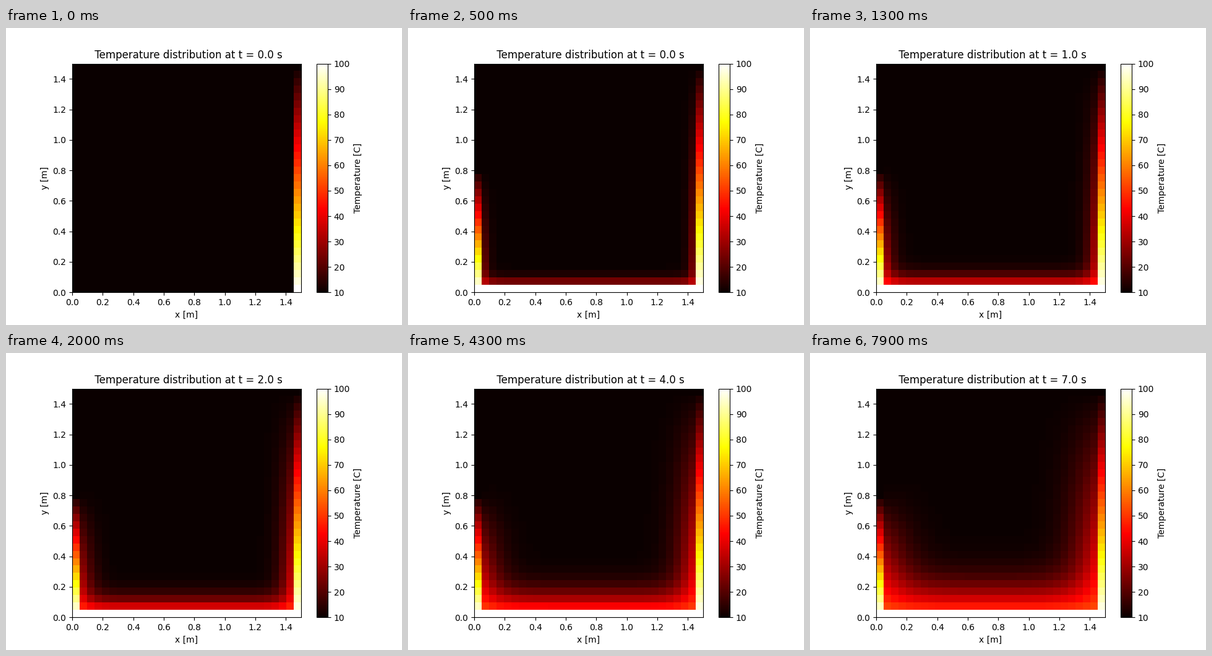
Recreate the animation shown at these times as a matplotlib script. Size 640 by 480 pixels, loop 8 s.

```python
import numpy as np
import matplotlib.pyplot as plt
from matplotlib.animation import FuncAnimation

SIDE = 1.5           # plate edge [m]
N = 31               # nodes per edge
FRAMES, DT = 80, 0.1
RATE = 0.9           # diffusivity / dx^2 [1/s]
COLD, HOT = 10.0, 100.0
SUBSTEPS = 4

y = np.linspace(0, SIDE, N)


def ramp(height):
    """Linear edge profile, hot at the bottom and cold from `height` up."""
    return np.maximum(HOT - (HOT - COLD) * y / height, COLD)


def set_edges(T):
    T[:, 0] = ramp(0.8)
    T[:, -1] = ramp(SIDE)
    T[-1] = COLD
    T[0] = HOT


def solve():
    """Temperature fields for every time step."""
    first = np.full((N, N), COLD)
    first[:, -1] = ramp(SIDE)

    edges = np.full((N, N), COLD)
    set_edges(edges)
    # The plate feels the mean of the cold and the heated edge.
    T = (edges + COLD) / 2

    fields = [first]
    k = RATE * DT / SUBSTEPS
    for _ in range(FRAMES - 1):
        for _ in range(SUBSTEPS):
            inner = T[1:-1, 1:-1]
            around = T[2:, 1:-1] + T[:-2, 1:-1] + T[1:-1, 2:] + T[1:-1, :-2]
            T[1:-1, 1:-1] = inner + k * (around - 4 * inner)
        shown = T.copy()
        set_edges(shown)
        fields.append(shown)
    return fields


fields = solve()

fig, ax = plt.subplots(figsize=(6.4, 4.8), dpi=100)
image = ax.imshow(fields[0], cmap="hot", vmin=COLD, vmax=HOT,
                  origin="lower", extent=(0, SIDE, 0, SIDE))
fig.colorbar(image, ax=ax, label="Temperature [C]")
ax.set_xlabel("x [m]")
ax.set_ylabel("y [m]")
title = ax.set_title("")


def update(i):
    image.set_data(fields[i])
    seconds = i // 10
    title.set_text(f" Temperature distribution at t = {seconds:.1f} s")
    return image, title


anim = FuncAnimation(fig, update, frames=FRAMES, interval=100,
                     repeat=True, repeat_delay=0)
plt.show()
```
